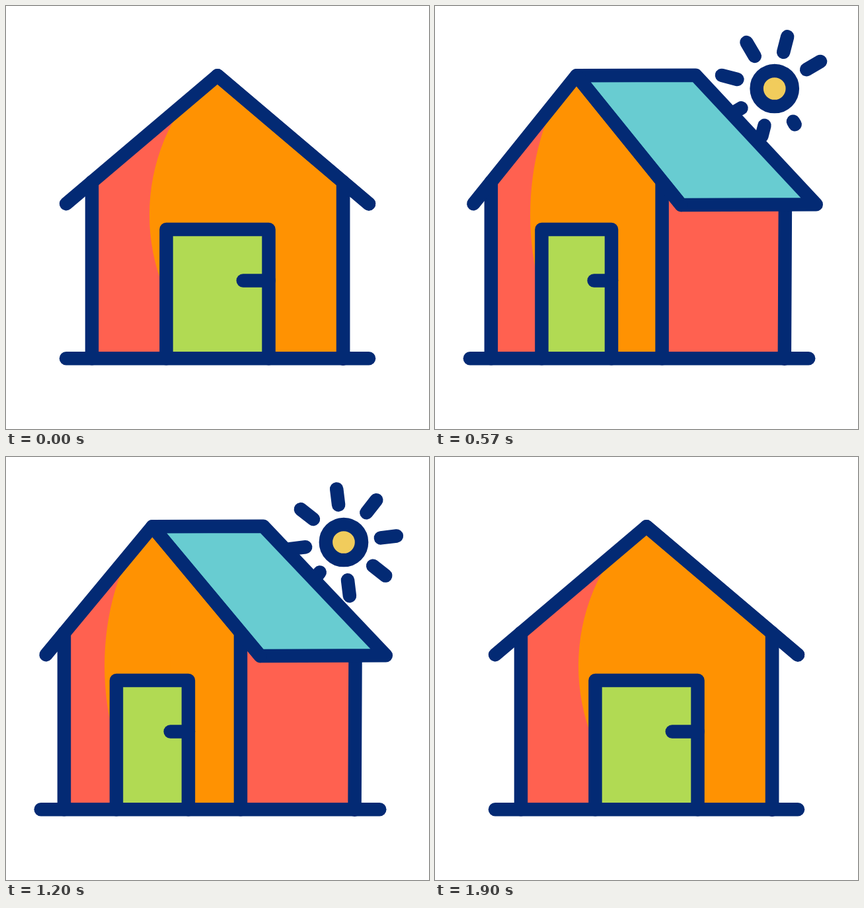
An HTML page with a canvas that plays this animation: 640x640 px, repeating every 2 s.

```html
<!DOCTYPE html>
<html lang="en">
<head>
<meta charset="utf-8">
<title>House and sun</title>
<style>
  html, body { margin: 0; width: 100%; height: 100%; overflow: hidden; background: #fff; }
  canvas { display: block; width: 100vw; height: 100vh; object-fit: contain; }
</style>
</head>
<body>
<canvas id="stage"></canvas>
<script>
const SIZE = 640, LOOP = 2000, STEP = 100 / 3;
const NAVY = '#032a74', ORANGE = '#ff9202', RED = '#ff6150';
const GREEN = '#b1da53', TEAL = '#68ccd1', YELLOW = '#f1cc5c';
const TOP = 266, FLOOR = 533.2;

const canvas = document.getElementById('stage');
const scale = window.devicePixelRatio || 1;
canvas.width = canvas.height = SIZE * scale;
const ctx = canvas.getContext('2d');

const clamp = v => Math.min(1, Math.max(0, v));
const smooth = v => v * v * (3 - 2 * v);

// Cubic bezier easing with control points (x1, 0) and (x2, 1).
function ease(x, x1, x2) {
  if (x <= 0 || x >= 1) return clamp(x);
  let lo = 0, hi = 1;
  for (let i = 0; i < 24; i++) {
    const s = (lo + hi) / 2, r = 1 - s;
    if (3 * s * r * r * x1 + 3 * s * s * r * x2 + s ** 3 < x) lo = s;
    else hi = s;
  }
  return smooth(lo);
}

// Rises from 0 to 1 between a and b, falls back between c and d.
function swing(t, [a, b, c, d], [x1, x2], [x3, x4] = [x1, x2]) {
  return ease((t - a) / (b - a), x1, x2) - ease((t - c) / (d - c), x3, x4);
}

function trace(points, closed) {
  ctx.beginPath();
  points.forEach(([x, y]) => ctx.lineTo(x, y));
  if (closed) ctx.closePath();
}

function line(...points) {
  trace(points);
  ctx.stroke();
}

function fill(color, ...points) {
  trace(points, true);
  ctx.fillStyle = color;
  ctx.fill();
}

function drawSun(t) {
  const rise = swing(t, [270, 660, 1000, 1800], [.5, .1], [.73, .48]);
  const turn = swing(t, [126, 866, 1056, 1796], [.42, .58]);
  if (rise <= 0) return;
  const x = 517.5 - 127 * (1 - rise);
  const y = 119.5 + 185 * (1 - rise);

  for (let j = 0; j < 8; j++) {
    const grown = smooth(clamp((t - 254 - 45 * j) / 140));
    const gone = smooth(clamp((t - 1196 - 45 * j) / 140));
    const size = grown - gone;
    if (size < .01) continue;
    const angle = (90 * turn - 45 * j) * Math.PI / 180;
    const at = r => [x - .9 + r * Math.sin(angle), y + .3 - r * Math.cos(angle)];
    line(at(57.3), at(57.3 + 24.2 * size));
  }

  ctx.beginPath();
  ctx.arc(x, y, 27.1, 0, 2 * Math.PI);
  ctx.fillStyle = YELLOW;
  ctx.fill();
  ctx.stroke();
}

function drawHouse(t) {
  const keys = [0, 800, 800, 1867];
  const p = swing(t, keys, [.87, .13]);
  const base = swing(t, keys, [.92, .27]);

  const left = 130 - 48 * p, right = 510 - 177 * p, span = right - left;
  const front = u => left + u * span;
  const apex = [front(.5), 105.2];
  const eaveL = [front(-.1026), 299.2];
  const eaveR = [front(1.1026 + .01 * p), 299.2 + 2 * p];
  const backApex = [320 + 79 * p, 105.2 - .6 * p];
  const backEave = [549 + 29.5 * p, 299.4 + p];
  const backTop = 510 + 21.3 * p, backFoot = 510 + 20 * p;

  // Side wall
  fill(RED, [right, TOP], [backTop, TOP], [backFoot, FLOOR], [right, FLOOR]);
  line([backTop, TOP + 8], [backFoot, FLOOR + .6]);

  // Front wall with its curved shade
  const outline = [apex, [right, TOP], [right, FLOOR], [left, FLOOR], [left, TOP]];
  fill(RED, ...outline);
  ctx.save();
  trace(outline, true);
  ctx.clip();
  ctx.beginPath();
  ctx.ellipse(front(1.0105), 316, .7816 * span, 297, 0, 0, 2 * Math.PI);
  ctx.rect(front(.5), 0, span, SIZE);
  ctx.fillStyle = ORANGE;
  ctx.fill();
  // Lower part right of the door stays orange.
  ctx.fillRect(front(.6), 300, span, 300);
  ctx.restore();

  // Door
  const d1 = front(.296), d2 = front(.704), lintel = 338;
  fill(GREEN, [d1, lintel], [d2, lintel], [d2, FLOOR], [d1, FLOOR]);
  line([d1, FLOOR], [d1, lintel], [d2, lintel], [d2, FLOOR]);
  line([front(.602), 415.5], [d2, 415.5]);

  // Front wall posts
  line([left, TOP], [left, FLOOR]);
  line([right, TOP], [right, FLOOR]);

  // Roof
  fill(TEAL, apex, backApex, backEave, eaveR);
  ctx.closePath();
  ctx.stroke();
  line(eaveL, apex, eaveR);

  // Ground
  line([91 - 42.3 * base, FLOOR], [549 + 18 * base, FLOOR]);
}

function draw(t) {
  ctx.setTransform(scale, 0, 0, scale, 0, 0);
  ctx.fillStyle = '#fff';
  ctx.fillRect(0, 0, SIZE, SIZE);
  ctx.strokeStyle = NAVY;
  ctx.lineWidth = 20.5;
  ctx.lineCap = ctx.lineJoin = 'round';
  drawSun(t);
  drawHouse(t);
}

const start = performance.now();
function tick() {
  const t = (performance.now() - start) % LOOP;
  draw(Math.floor((t + 4) / STEP) * STEP % LOOP);
  requestAnimationFrame(tick);
}
tick();
</script>
</body>
</html>
```
